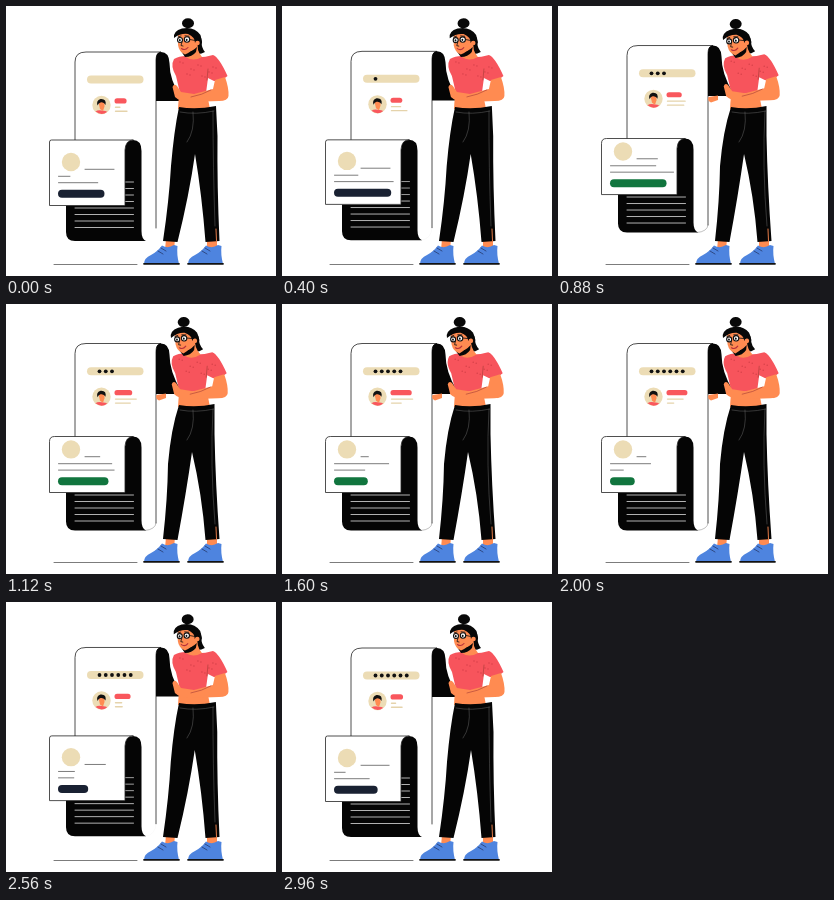
An HTML page for the animation above (3040 ms loop, 270x270 px).

```html
<!DOCTYPE html>
<html lang="en">
<head>
<meta charset="utf-8">
<title>Sign-up form</title>
<style>
  html, body { margin: 0; width: 100%; height: 100%; overflow: hidden; background: #fff; }
  svg { display: block; width: 100vw; height: 100vh; }
</style>
</head>
<body>
<svg id="stage" viewBox="0 0 270 270" fill="none" stroke-linecap="round" stroke-linejoin="round">
  <path d="M48 258.5H131" stroke="#444" stroke-width=".7"/>

  <!-- tall sheet -->
  <path id="sheet" fill="#fff" stroke="#222" stroke-width=".8"/>
  <path id="corner" stroke="#222" stroke-width=".7"/>
  <g id="screen">
    <rect x="81" y="69.5" width="56.5" height="8" rx="4" fill="#ecdcb5"/>
    <g id="dots" fill="#111"></g>
    <circle cx="95.5" cy="99" r="9.2" fill="#ecdcb5"/>
    <path d="M89.5 105.5Q92 103.5 96 104.5Q100 104.5 101 106Q95.5 110 89.5 105.5Z" fill="#f9575d"/>
    <path d="M92.5 96.5Q95 93.5 98.5 96V100.5L97 105L94 103Z" fill="#ff8b51"/>
    <path d="M91.5 99.5Q89.8 94.5 94.5 93Q100.8 92.5 99.5 99Q98 95.8 94.5 96.5Q92.5 97 91.5 99.5Z" fill="#111"/>
    <rect id="pill" x="108.5" y="92.3" height="5.2" rx="2.6" fill="#f9575d"/>
    <path id="note1" stroke="#e5d3ab" stroke-width="1.4"/>
    <path id="note2" stroke="#e5d3ab" stroke-width="1.4"/>
  </g>
  <path id="curl" fill="#050505"/>

  <!-- front card with its dark back -->
  <path id="back" fill="#050505"/>
  <g id="rules" stroke="#ddd" stroke-width=".8"></g>
  <path id="card" fill="#fff" stroke="#222" stroke-width=".8"/>
  <g id="form">
    <circle cx="65" cy="156" r="9.2" fill="#ecdcb5"/>
    <path id="line1" stroke="#444" stroke-width=".7"/>
    <path id="line2" stroke="#444" stroke-width=".7"/>
    <path id="line3" stroke="#444" stroke-width=".7"/>
    <rect id="button" x="52" y="183.8" height="8" rx="4"/>
  </g>

  <!-- woman -->
  <path d="M160 233H169L168 244H159Z M201 233H211V244H201Z" fill="#ff8b51"/>
  <g id="shoe">
    <path d="M138 258Q138 252 145 249Q151 246 156 239.5Q162 243 168 239L171.5 240Q170.5 248 173 258Z" fill="#4e84df"/>
    <path d="M138 257.8H173" stroke="#111" stroke-width="1.8"/>
    <path d="M152 245L157 248M155 242L160 245" stroke="#22305e" stroke-width=".7"/>
  </g>
  <use href="#shoe" x="44"/>
  <path d="M173 88H201L204 103H172Z" fill="#ff8b51"/>
  <path id="trousers" fill="#050505"/>
  <path id="seams" stroke="#666" stroke-width=".5"/>
  <path d="M210 223L210.5 235" stroke="#ff8b51" stroke-width=".9"/>
  <path id="farHand" d="M150.5 91L160 89.5V94L153 96.5Q149 95 150.5 91Z" fill="#ff8b51"/>
  <g id="body">
    <path d="M168 53Q173 50 180 50Q194 53 207 49Q213 51 221.5 70Q216 75 208 75L202 72L200 87Q186 90 174 87L170 70Q164 60 168 53Z" fill="#f7545c"/>
    <g id="specks" fill="#d23f48"></g>
    <path d="M209 74L219 71Q223 82 222.5 90Q222 95 213 95L184 96Q174 96 169 91L166.5 81Q168 77 171 80L175 86L188 88L207 83Z" fill="#ff8b51"/>
    <path d="M202 63L201 74M185 91Q196 89 205 84" stroke="#a43b36" stroke-width=".6"/>
    <g id="head">
      <path d="M188 27Q196 28 196 36Q195 41 199 46Q192 50 186 46Z" fill="#080808"/>
      <path d="M182 38L192 35Q190 44 196 51Q187 56 180 51Z" fill="#ff8b51"/>
      <path d="M175 45Q184 48 191 41L190 46Q186 51 179 51Z" fill="#080808"/>
      <path d="M172 28Q181 22 192 29L192 38Q187 45 179 48.5Q173 46 172 39Z" fill="#ff8b51"/>
      <path d="M168 32Q167 25 176 22.5Q188 20 194.5 29L196 37L192 35L189 37Q189 31 182 28Q175 27 168 32Z" fill="#080808"/>
      <circle cx="191.5" cy="37" r="2.3" fill="#ff8b51"/>
      <ellipse cx="182" cy="17.3" rx="6" ry="5" fill="#080808"/>
      <g fill="#fff" stroke="#111" stroke-width="1.1">
        <circle cx="174" cy="34" r="2.5"/><circle cx="181" cy="33.5" r="2.7"/>
      </g>
      <path d="M173.8 34V34.4M180.7 33.6V34" stroke="#111" stroke-width="1.8"/>
      <path d="M184 33.5L189 34.5M172 31L175 30M179 29.8L183 30.2M176 36L175 39.5L177 40" stroke="#111" stroke-width=".8"/>
      <path d="M175.5 42.5Q179 45 182 41.5" stroke="#b62f3a" stroke-width="1.1"/>
    </g>
  </g>
</svg>
<script>
const LOOP = 3040, STEP = 80;
// Right end of each bar: middle, swing, time of the longest state
const BARS = {
  pill:   [125, 5, 1760],
  note1:  [122.5, 9, 1380],
  note2:  [120.5, 5.5, 720],
  line1:  [97.5, 11.5, 200],
  line2:  [86, 23, 1380],
  line3:  [89.5, 27.5, 720],
  button: [93.5, 17.5, 620]
};
const $ = id => document.getElementById(id);
const set = (id, name, value) => $(id).setAttribute(name, value);
const clamp = x => Math.min(1, Math.max(0, x));
const ease = u => u < .5 ? 4 * u ** 3 : 1 - 4 * (1 - u) ** 3;
const ramp = (t, start, length) => ease(clamp((t - start) / length));

function barEnd(name, t) {
  const [middle, swing, peak] = BARS[name];
  return middle + swing * Math.cos(2 * Math.PI * (t - peak) / LOOP);
}

function add(parent, tag, attrs) {
  const node = document.createElementNS("http://www.w3.org/2000/svg", tag);
  for (const key in attrs) node.setAttribute(key, attrs[key]);
  $(parent).append(node);
  return node;
}

const dots = Array.from({ length: 6 }, (_, i) =>
  add("dots", "circle", { cx: 93.5 + i * 6.25, cy: 73.5, r: 1.9 }));
const rules = Array.from({ length: 8 }, (_, i) =>
  add("rules", "path", { d: `M69 ${176 + i * 6.5}H127.5` }));
for (let i = 0; i < 14; i++) {
  add("specks", "circle", { cx: 174 + (i * 11) % 37, cy: 56 + (i * 7) % 16, r: .7 });
}

function drawSheet(lift, t) {
  const top = 46 - 6.5 * lift, end = 235 - 8.5 * lift, hem = 95 - 5 * lift;
  set("sheet", "d", `M69 134V${top + 10}Q69 ${top} 80 ${top}H155Q150 ${top + 1} 150 ${top + 8}V${222 - 3 * lift}`);
  set("corner", "d", `M150 ${222 - 3 * lift}Q149.5 ${end - 1} 139 ${end}`);
  set("corner", "opacity", .4 * lift);
  set("curl", "d", `M150 ${hem}V${top + 7}Q150 ${top} 155 ${top}Q163 ${top} 163.5 ${top + 11}
    Q163.5 ${top + 28} 175 ${hem - 3}L174 ${hem}Z`);
  set("screen", "transform", `translate(0 ${-6.2 * lift})`);
  set("pill", "width", barEnd("pill", t) - 108.5);
  set("note1", "d", `M109.5 101.3H${barEnd("note1", t)}`);
  set("note2", "d", `M109.5 105.3H${barEnd("note2", t)}`);
  const typed = Math.floor((t - 240) / 320) + 1;
  dots.forEach((dot, i) => dot.setAttribute("visibility", i < typed ? "visible" : "hidden"));
}

function drawCard(lift, t) {
  const top = 134 - 1.5 * lift, bottom = 199.5 - 11 * lift, end = 235 - 8.5 * lift;
  const round = 2 + 3 * lift;
  set("back", "d", `M119 ${bottom}V${top + 10}Q119 ${top} 127 ${top}
    Q135.5 ${top} 135.5 ${top + 11}V${end - 10}Q135.5 ${end - 2} 140 ${end}
    H69Q60 ${end} 60 ${end - 9}V${bottom}Z`);
  set("rules", "transform", `translate(0 ${-4.5 * lift})`);
  rules.forEach((rule, i) => rule.setAttribute("opacity", i < 3 ? clamp(1 - 1.3 * lift) : 1));
  set("card", "d", `M127 ${top}H${43.5 + round}Q43.5 ${top} 43.5 ${top + round}
    V${bottom}H119V${top + 10}Q119.5 ${top} 127 ${top}`);
  set("form", "transform", `translate(0 ${-10.6 * lift})`);
  set("line1", "d", `M79 163.3H${barEnd("line1", t)}`);
  set("line2", "d", `M52.5 170.3H${barEnd("line2", t)}`);
  set("line3", "d", `M52.5 176.7H${barEnd("line3", t)}`);
  set("button", "width", barEnd("button", t) - 52);
  const tint = clamp((lift - .1) / .45);
  const mix = (a, b) => Math.round(a + (b - a) * tint);
  set("button", "fill", `rgb(${mix(25, 17)} ${mix(33, 117)} ${mix(50, 62)})`);
}

function drawWoman(lift) {
  const lean = 3 * lift;
  set("trousers", "d", `M173 101Q190 104 ${210 - lean / 2} 100L${211.5 - lean} 130
    Q${211 - lean / 2} 180 213.5 235L199.5 236Q196 190 ${189 - lean} 148
    Q${183 - lean} 190 171.5 236L157 235Q${163 - lean / 2} 195 ${165 - lean} 160Q${168 - lean} 125 173 101Z`);
  set("seams", "d", `M207 105Q${207 - lean} 160 209 220M187 106Q189 125 181 136M174 106Q190 109 208 105`);
  set("farHand", "opacity", clamp((lift - .2) * 4));
  set("body", "transform", `translate(${-.8 * lift} ${-.8 * lift})`);
  set("head", "transform", `translate(${-.7 * lift} ${lift}) rotate(${-5 * lift} 187 50)`);
}

function draw(t) {
  const lift = ramp(t, 160, 815) - ramp(t, 1968, 812);
  drawSheet(lift, t);
  drawCard(lift, t);
  drawWoman(lift);
}

function tick(now) {
  draw(Math.floor(now % LOOP / STEP) * STEP);
  requestAnimationFrame(tick);
}
draw(0);
requestAnimationFrame(tick);
</script>
</body>
</html>
```
